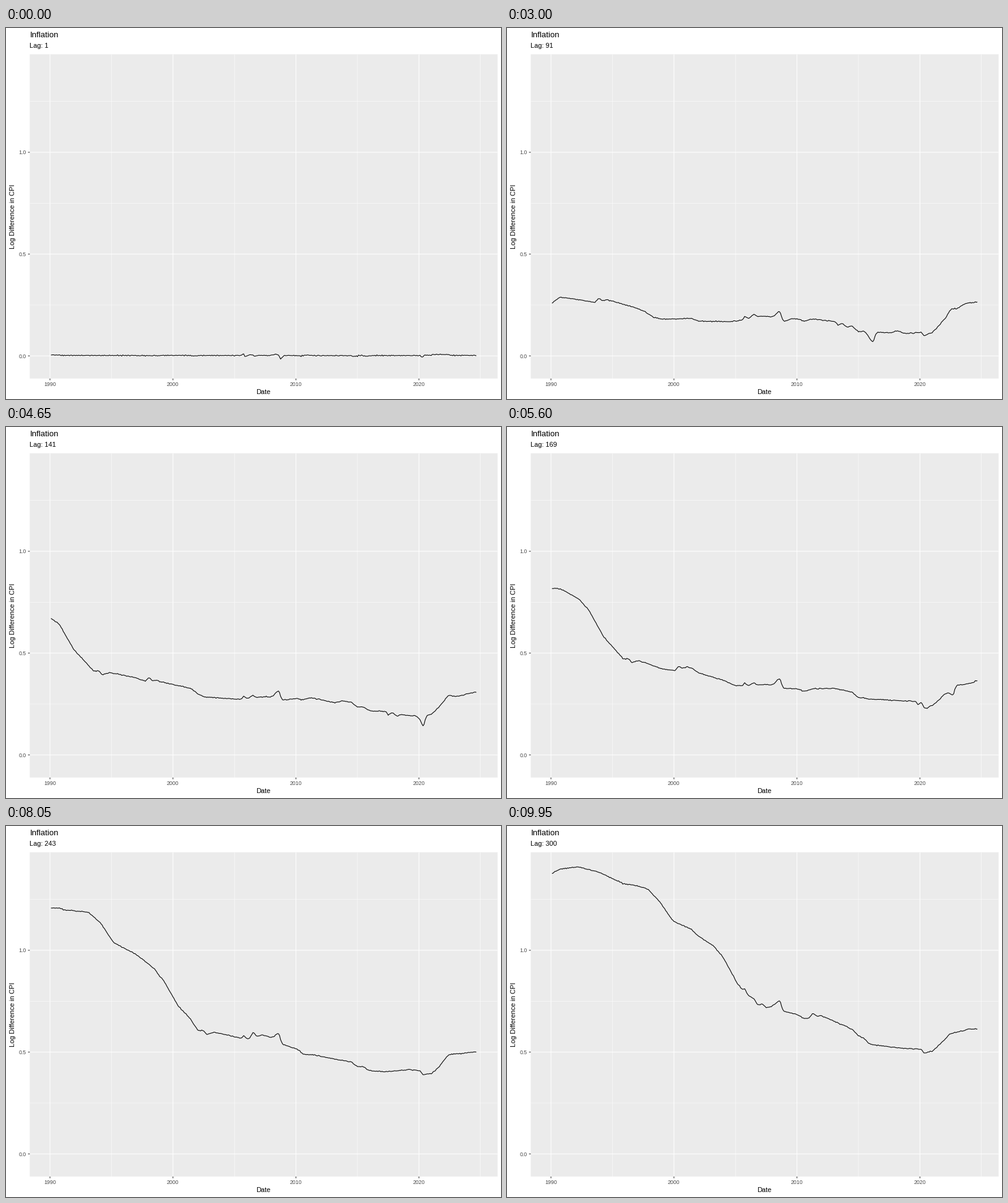
Write a matplotlib script that moves like this. It is 800 by 600 pixels and loops after 10 s.

```python
import numpy as np
import matplotlib.pyplot as plt
from matplotlib.animation import FuncAnimation
from matplotlib.patches import Rectangle

W, H, DPI = 800, 600, 100
FRAMES, INTERVAL = 200, 50
MAX_LAG = 300
LEFT, TOP, RIGHT, BOTTOM = 38.4, 42.5, 794.5, 566.9

plt.rcParams["font.family"] = "Liberation Sans"
plt.rcParams["path.snap"] = False

# Years where inflation changes pace, with the price level there
TREND = [
    (1965, 31.8), (1967.2, 33.4), (1969, 36.1), (1970.9, 40.0),
    (1972.9, 42.9), (1973.9, 46.5), (1974.9, 52.3), (1977, 59.1),
    (1978.2, 63.8), (1979, 68.9), (1980.2, 81.0), (1981.75, 93.6),
    (1982.5, 97.5), (1983.1, 97.9), (1986, 109.3), (1987, 110.6),
    (1990, 125.8), (1990.8, 131.3), (1993, 139.9), (1997, 155.2),
    (1999, 160.1), (2001.4, 172.0), (2002, 172.3), (2005.4, 187.1),
    (2007.6, 200.5), (2009, 203.9), (2011.4, 215.8), (2014.5, 227.2),
    (2015, 224.4), (2016.1, 226.5), (2020.1, 246.8), (2021, 250.2),
    (2022.45, 281.8), (2024.7, 301.9),
]

# Short-lived shocks: peak year, years to build, years to fade, log height
SHOCKS = [
    (1982.2, 0.12, 0.12, -0.010),
    (1986.3, 0.15, 0.15, -0.015),
    (2005.73, 0.06, 0.12, 0.014),
    (2006.5, 0.20, 0.15, 0.011),
    (2008.6, 0.28, 0.12, 0.041),
    (2010.6, 0.25, 0.25, -0.011),
    (2015.45, 0.20, 0.20, 0.009),
    (2020.32, 0.08, 0.25, -0.016),
]


def pulse(t, peak, build, fade, height):
    width = np.where(t < peak, build, fade)
    return height * np.exp(-0.5 * ((t - peak) / width) ** 2)


def x_pos(year):
    return 71.06 + 19.877 * (year - 1990)


def y_pos(value):
    return 530.3 - 329.3 * value


def px(size):
    return size * 72 / DPI


# Monthly log price level, January 1965 to September 2024
dates = 1965 + np.arange(717) / 12
years, levels = np.transpose(TREND)
log_price = np.interp(dates, years, np.log(levels))
log_price += sum(pulse(dates, *shock) for shock in SHOCKS)
log_price += np.random.default_rng(4).normal(0, 0.0008, len(dates))
shown = np.arange(MAX_LAG + 1, len(dates))

fig = plt.figure(figsize=(W / DPI, H / DPI), dpi=DPI, facecolor="white")
ax = fig.add_axes([0, 0, 1, 1])
ax.set_xlim(0, W)
ax.set_ylim(H, 0)
ax.axis("off")


def stroke(xs, ys, color, width, z):
    return ax.plot(xs, ys, color=color, lw=px(width), zorder=z,
                   solid_capstyle="butt", solid_joinstyle="round")[0]


def label(x, y, text, size, color="black", ha="left", **kw):
    return ax.text(x, y, text, fontsize=px(size), color=color, ha=ha,
                   va="baseline", **kw)


def draw_panel():
    ax.add_patch(Rectangle((LEFT, TOP), RIGHT - LEFT, BOTTOM - TOP,
                           facecolor="#EBEBEB", lw=0, zorder=1))
    for value in (0.25, 0.75, 1.25):
        stroke([LEFT, RIGHT], [y_pos(value)] * 2, "white", 0.53, 2)
    for year in range(1995, 2026, 10):
        stroke([x_pos(year)] * 2, [TOP, BOTTOM], "white", 0.53, 2)
    for value in (0, 0.5, 1):
        y = y_pos(value)
        stroke([LEFT, RIGHT], [y, y], "white", 1.07, 3)
        stroke([LEFT - 2.75, LEFT], [y, y], "#333333", 1.07, 3)
        label(33, y + 3.2, f"{value:.1f}", 8.8, "#4D4D4D", "right")
    for year in range(1990, 2021, 10):
        x = x_pos(year)
        stroke([x, x], [TOP, BOTTOM], "white", 1.07, 3)
        stroke([x, x], [BOTTOM, BOTTOM + 2.75], "#333333", 1.07, 3)
        label(x, 579, str(year), 8.8, "#4D4D4D", "center")
    label(38.4, 15, "Inflation", 13.2)
    label(415.8, 592.3, "Date", 11, ha="center")
    label(14, (TOP + BOTTOM) / 2, "Log Difference in CPI", 11, ha="center",
          rotation=90, rotation_mode="anchor")


draw_panel()
curve = stroke(x_pos(dates[shown]), np.zeros(len(shown)), "black", 1.07, 4)
subtitle = label(38.4, 32, "", 11)


def update(frame):
    lag = round(1 + frame * (MAX_LAG - 1) / (FRAMES - 1))
    curve.set_ydata(y_pos(log_price[shown] - log_price[shown - lag]))
    subtitle.set_text(f"Lag: {lag}")
    return curve, subtitle


anim = FuncAnimation(fig, update, frames=FRAMES, interval=INTERVAL,
                     repeat=True, repeat_delay=0, blit=False)
plt.show()
```
